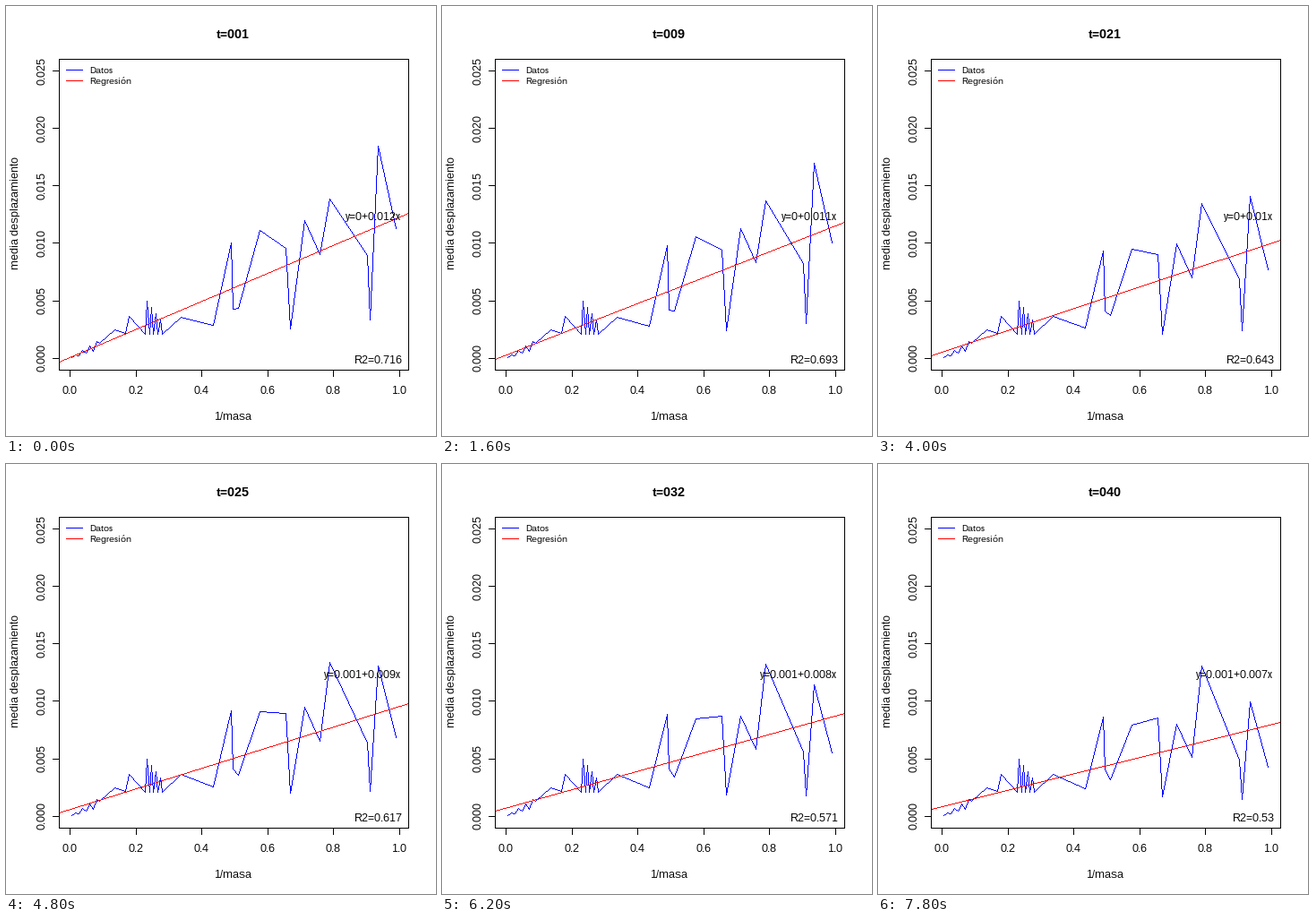
Recreate the animation shown at these times as a matplotlib script. Size 480x480 px, loop 8 s.

```python
import numpy as np
import matplotlib.pyplot as plt
from matplotlib.animation import FuncAnimation
from matplotlib.patches import Rectangle

plt.rcParams.update({
    "font.family": "Liberation Sans",
    "font.size": 12,
    "text.hinting": "native",
    "text.hinting_factor": 1,
    "text.kerning_factor": 6,
    "lines.antialiased": False,
    "patch.antialiased": False,
})

SIZE, DPI = 480, 72
STEPS, INTERVAL = 40, 200
LEFT, RIGHT, TOP, BOTTOM = 59, 449, 59, 406
X0, X_UNIT = 71, 368        # pixel of x = 0, pixels per unit
Y0, Y_UNIT = 393, 12860
BLUE, RED = "#0000ff", "#ff0000"

# Heavy masses hardly move; the light ones slide from a first to a last height.
STILL = [(104, 377), (121, 362), (133, 366), (137, 347)]
SLIDING = [
    (195, 348, 347), (231, 357, 363), (251, 265, 283), (253, 339, 342),
    (259, 338, 353), (283, 251, 292), (312, 271, 284), (317, 361, 372),
    (333, 240, 291), (350, 278, 328), (361, 216, 226), (403, 279, 331),
    (406, 351, 375), (415, 157, 266), (435, 249, 339),
]
R2 = {1: 0.716, 9: 0.693, 15: 0.676, 21: 0.643, 25: 0.617, 32: 0.571, 40: 0.53}

fig = plt.figure(figsize=(SIZE / DPI, SIZE / DPI), dpi=DPI, facecolor="white")
ax = fig.add_axes([0, 0, 1, 1])
ax.set_xlim(0, SIZE)
ax.set_ylim(SIZE, 0)
ax.axis("off")


def ease(p):
    return p - 0.03 * np.sin(2 * np.pi * p)


def mix(a, b, p):
    return a + (b - a) * p


def heavy_points():
    """A widening zigzag near the origin, a few steps, then a steep zigzag."""
    k = np.arange(8)
    u = k / 7
    start = np.c_[mix(73, 101, u), Y0 - 13 * u + 5 * u * (-1.0) ** k]
    k = np.arange(9)
    steep = np.c_[mix(155, 174, k / 8),
                  np.where(k % 2, 330 + 3.5 * (k - 1), 367)]
    return np.vstack([start, STILL, steep])


def pixel_path(points):
    """Every pixel on the one-pixel-wide path through the points."""
    points = np.rint(points)
    parts = []
    for a, b in zip(points, points[1:]):
        count = int(abs(b - a).max()) + 1
        parts.append(np.linspace(a, b, count))
    return np.floor(np.vstack(parts) + 0.5).T


def line(xs, ys, color="black"):
    ax.plot(xs, ys, color=color, lw=1, solid_capstyle="butt")


def label(x, y, text="", ha="center", **style):
    return ax.text(x, y, text, ha=ha, va="baseline",
                   rotation_mode="anchor", **style)


def draw_axes():
    ax.add_patch(Rectangle((LEFT, TOP), RIGHT - LEFT, BOTTOM - TOP,
                           fill=False, ec="black", lw=1, zorder=2.5))
    for i in range(6):
        x = round(X0 + i * 0.2 * X_UNIT)
        line((x, x), (BOTTOM, BOTTOM + 7))
        label(x, 433, f"{i * 0.2:.1f}")
        y = round(Y0 - i * 0.005 * Y_UNIT)
        line((LEFT - 7, LEFT), (y, y))
        label(44, y, f"{i * 0.005:.3f}", rotation=90)
    label(254, 462, "1/masa")
    label(14, 231, "media desplazamiento", rotation=90)


def draw_legend():
    for y, color, name in ((71, BLUE, "Datos"), (83, RED, "Regresión")):
        line((67, 85), (y, y), color)
        label(93, y + 4, name, ha="left", fontsize=10)


draw_axes()
draw_legend()
curve, = ax.plot([], [], ",", color=BLUE)
fit, = ax.plot([], [], ",", color=RED)
title = label(253, 36, fontsize=14, fontweight="bold")
formula = label(441, 239, ha="right")
score = label(443, 399, ha="right")

HEAVY = heavy_points()
LIGHT_X, FIRST_Y, LAST_Y = np.array(SLIDING).T


def number(value):
    return f"{round(value, 3):g}"


def update(i):
    t = i + 1
    p = ease(i / (STEPS - 1))
    light = np.c_[LIGHT_X, mix(FIRST_Y, LAST_Y, p)]
    curve.set_data(*pixel_path(np.vstack([HEAVY, light])))

    a, b = mix(397.5, 385.5, p), mix(232.5, 289, p)
    fit.set_data(*pixel_path([(LEFT, a), (RIGHT, b)]))
    rise = (a - b) / (RIGHT - LEFT)
    slope = rise * X_UNIT / Y_UNIT
    intercept = (Y0 - a + rise * (X0 - LEFT)) / Y_UNIT

    title.set_text(f"t={t:03d}")
    formula.set_text(f"y={number(intercept)}+{number(slope)}x")
    score.set_text(f"R2={number(np.interp(t, list(R2), list(R2.values())))}")
    return curve, fit, title, formula, score


anim = FuncAnimation(fig, update, frames=STEPS, interval=INTERVAL,
                     init_func=lambda: update(0), repeat=True, repeat_delay=0)
plt.show()
```
